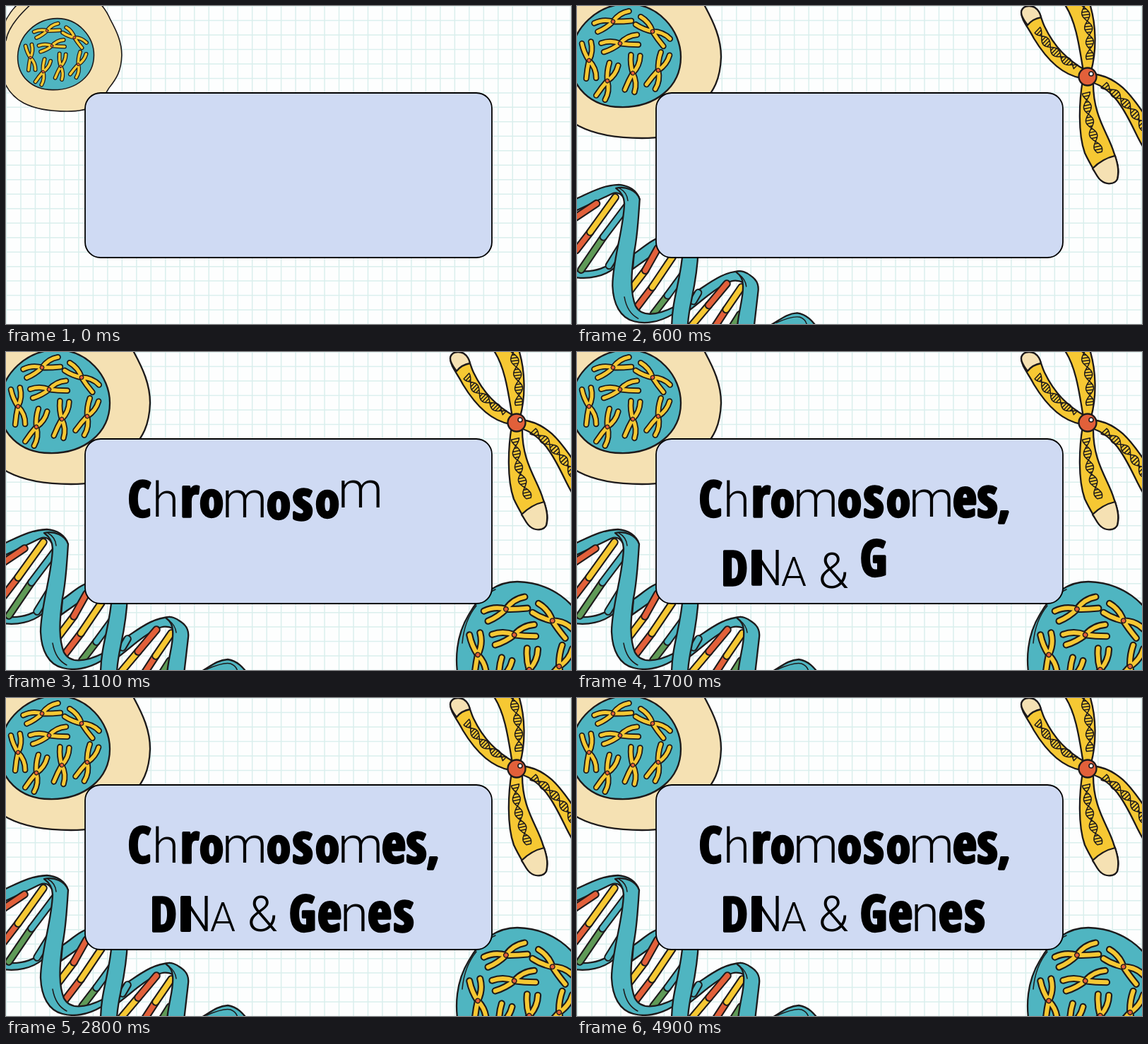
An HTML page for the animation above (5 s loop, 800 by 450 pixels).

```html
<!DOCTYPE html>
<html lang="en">
<head>
<meta charset="utf-8">
<title>Chromosomes, DNA &amp; Genes</title>
<style>
html, body { margin: 0; width: 100%; height: 100%; overflow: hidden; background: #fdfefe; }
svg { display: block; width: 100vw; height: 100vh; }
.ink { stroke: #1d1a1b; stroke-width: 2.3; stroke-linejoin: round; stroke-linecap: round; }
.line { fill: none; }
.thin { fill: none; stroke-width: 1.5; }
text { text-anchor: middle; stroke: #000; stroke-linejoin: round; }
.heavy { font: 700 10px "Open Sans Condensed", "Roboto Condensed", "Open Sans", sans-serif; font-stretch: 75%; stroke-width: 3.4; }
.light { font: 300 10px Roboto, Lato, "Open Sans", sans-serif; font-stretch: 75%; stroke-width: 0; }
</style>
</head>
<body>
<svg id="stage" viewBox="0 0 800 450"></svg>
<script>
const TEAL = '#4fb5c1', BEIGE = '#f5e1b3', YELLOW = '#f6c833', RED = '#e2603a', GREEN = '#5f9a57', INK = '#1d1a1b';
const LOOP = 5000, STEP = 100;
const stage = document.getElementById('stage');

const shape = (d, fill) => `<path class="ink" d="${d}" fill="${fill}"/>`;
const line = (d, kind = 'line') => `<path class="ink ${kind}" d="${d}"/>`;
const stroke = (d, color, width) =>
  `<path d="${d}" fill="none" stroke="${color}" stroke-width="${width}" stroke-linecap="round" stroke-linejoin="round"/>`;
const tube = (d, color, outer, inner) => stroke(d, INK, outer) + stroke(d, color, inner);
const bar = (x1, y1, x2, y2, color) => tube(`M${x1} ${y1}L${x2} ${y2}`, color, 11.6, 7.4);

function grid() {
  let d = '';
  for (let p = .5; p < 801; p += 20.48) d += `M${p} 0V450M0 ${p - .5}H800`;
  return `<path d="${d}" stroke="#daefed" stroke-width="1.5"/>`;
}

function smallChromosome([x, y, angle]) {
  const arms = 'M-26 -6Q-12 -8 0 0Q12 -9 26 -7M-25 7Q-12 6 0 0Q11 4 25 7';
  return `<g transform="translate(${x} ${y}) rotate(${angle})">${tube(arms, YELLOW, 8.6, 5)}
    <circle class="ink" r="2.8" fill="${RED}" style="stroke-width:1.2"/></g>`;
}

const cluster = [[51, 22, -18], [107, 36, 38], [61, 53, -12], [17, 77, 83],
  [43, 106, 112], [79, 95, 100], [115, 91, 114]].map(smallChromosome).join('');

const cell =
  shape('M-34 132C-55 90 -45 35 -33 0C-20 -25 0 -45 30 -57H110C150 -50 168 -30 181 0C194 24 204 46 204 72C203 105 193 120 178 139C158 175 142 187 92 187C60 187 28 183 3 170C-15 160 -27 146 -34 132Z', BEIGE) +
  line('M-33 42C-28 10 5 -20 22 -36') +
  shape('M-9 74C-7 30 30 -3 72 -3C115 -3 147 34 147 72C147 115 110 144 62 143C20 143 -10 115 -9 74Z', TEAL) + cluster;

const nucleus =
  shape('M642 470C634 435 638 400 655 372C672 342 694 325 724 325C770 326 808 352 826 400C838 460 790 515 725 513C680 512 650 495 642 470Z', TEAL) +
  line('M646 412C648 390 656 371 666 359M672 351C679 344 686 339 693 336', 'thin') +
  `<g transform="translate(648 338) scale(1.175)">${cluster}</g>`;

// Small double helix between two points, bowed sideways
function helix(x1, y1, x2, y2, bow) {
  const len = Math.hypot(x2 - x1, y2 - y1), nx = (y1 - y2) / len, ny = (x2 - x1) / len;
  const at = (s, side) => {
    const off = bow * Math.sin(Math.PI * s) + side * 5.5 * Math.cos(Math.PI * s * len / 20);
    return `${(x1 + (x2 - x1) * s + nx * off).toFixed(1)} ${(y1 + (y2 - y1) * s + ny * off).toFixed(1)}`;
  };
  let a = '', b = '', rungs = '';
  for (let i = 0; i <= 40; i++) {
    const s = i / 40;
    a += (i ? 'L' : 'M') + at(s, 1);
    b += (i ? 'L' : 'M') + at(s, -1);
    if (i % 2 == 0) rungs += `M${at(s, 1)}L${at(s, -1)}`;
  }
  return line(a + b + rungs, 'thin');
}

const chromosome =
  shape('M717 92C712 65 708 25 692 0L680 -30H715L727 0C735 28 736 62 728 92Z', YELLOW) +
  shape('M731 96C770 101 788 132 806 157V206C788 184 775 122 729 108Z', YELLOW) +
  shape('M714 102C690 98 667 79 647 46C639 30 629 20 629 9C630 0 640 -2 648 2C657 9 657 19 662 29C676 58 694 76 720 91Z', YELLOW) +
  shape('M629 9C630 0 640 -2 648 2C654 6 656 11 657 16Q645 18 638 27C634 21 629 16 629 9Z', BEIGE) +
  shape('M716 105C711 135 709 180 719 208C726 223 731 230 737 241C744 252 759 254 765 245C769 232 764 218 760 207C753 181 730 157 731 107Z', YELLOW) +
  shape('M730 230C735 237 737 243 742 247C750 254 762 252 765 245C768 232 765 222 762 212Q744 216 730 230Z', BEIGE) +
  helix(652, 34, 706, 86, 5) + helix(715, -8, 726, 75, -4) +
  helix(746, 112, 804, 174, -5) + helix(721, 123, 740, 207, 4) +
  `<circle class="ink" cx="723" cy="100" r="12.5" fill="${RED}"/>
   <circle class="ink" cx="728" cy="96" r="3" fill="#fff" style="stroke-width:1.6"/>`;

const rungs = [
  [-4, 298, 26, 278, RED], [-3, 345, 17, 319, RED], [17, 319, 53, 269, YELLOW],
  [4, 373, 36, 326, GREEN], [36, 326, 70, 281, TEAL], [44, 367, 62, 338, TEAL],
  [74, 403, 96, 374, YELLOW], [96, 374, 114, 342, RED],
  [80, 432, 106, 398, RED], [106, 398, 135, 355, YELLOW],
  [108, 436, 128, 410, GREEN], [128, 410, 150, 380, TEAL], [165, 418, 172, 406, TEAL],
  [160, 456, 187, 424, YELLOW], [187, 424, 213, 393, RED],
  [195, 456, 212, 430, RED], [212, 430, 234, 398, YELLOW], [220, 456, 232, 437, GREEN]
].map(r => bar(...r)).join('');

const dna =
  shape('M-60 345C-40 375 -20 375 5 375C25 376 40 370 56 358L52 370C38 382 15 388 -10 383C-35 378 -50 365 -60 345Z', TEAL) +
  shape('M80 350C95 340 105 328 130 322V340C110 348 95 360 78 372Z', TEAL) +
  shape('M-40 285C5 272 25 252 58 251C72 252 84 259 88 272L66 278C66 266 58 260 48 264C25 275 5 285 -30 300Z', TEAL) +
  shape('M160 410C185 395 205 376 232 375L238 392C226 386 218 389 210 394C190 404 175 420 158 432Z', TEAL) +
  rungs +
  shape('M88 272C86 300 85 325 80 348C75 385 75 407 82 425C90 440 110 440 138 426L135 437C115 449 95 451 80 447C60 442 50 422 49 396C49 360 65 315 66 278C66 268 62 262 54 256C68 253 84 259 88 272Z', TEAL) +
  line('M59 256Q70 262 71 274M66 412Q70 435 86 443', 'thin') +
  shape('M150 345C147 390 134 415 134 456H157C157 425 170 400 172 345Z', TEAL) +
  shape('M226 376C233 373 242 377 248 382C257 388 259 396 258 404L252 456H228C230 430 238 410 236 394C236 387 233 381 226 376Z', TEAL) +
  line('M231 380Q240 387 241 397', 'thin') +
  shape('M268 456C285 450 295 436 314 435C328 437 336 447 343 456Z', TEAL) +
  line('M284 449C298 443 310 439 318 441Q326 444 328 452', 'thin');

// Parts pop in one after another, each about its own centre
const parts = [
  { art: cell, x: 74, y: 64, start: -60 },
  { art: chromosome, x: 725, y: 105, start: 160 },
  { art: dna, x: 145, y: 390, start: 380 },
  { art: nucleus, x: 730, y: 418, start: 600 }
];

// letter, centre x, slot width, face
const lines = [
  { y: 233, order: 0, letters: [['C', 189, 36, 'heavy'], ['h', 226, 38, 'light'], ['r', 260, 30, 'heavy'],
    ['o', 291, 34, 'heavy'], ['m', 338, 64, 'light'], ['o', 386, 34, 'heavy'], ['s', 420, 33, 'heavy'],
    ['o', 455, 34, 'heavy'], ['m', 502, 64, 'light'], ['e', 549, 34, 'heavy'], ['s', 581, 33, 'heavy'],
    [',', 605, 18, 'heavy']] },
  { y: 330, order: 13, letters: [['D', 223, 37, 'heavy'], ['N', 267, 50, 'light'], ['A', 307, 36, 'light'], [' '],
    ['&amp;', 363, 44, 'light'], [' '], ['G', 420, 40, 'heavy'], ['e', 458, 34, 'heavy'], ['n', 493, 40, 'light'],
    ['e', 529, 34, 'heavy'], ['s', 563, 33, 'heavy']] }
];

// The N has one heavy stem
const glyph = (y, i, [ch, x, slot, face]) => ch == ' ' ? '' :
  `<g class="glyph" data-order="${i}">${ch == 'N' ? `<rect x="247" y="${y - 50}" width="15" height="51" rx="2"/>` : ''}
   <text class="${face}" x="${x}" y="${y}" data-slot="${slot}">${ch}</text></g>`;

stage.innerHTML = grid() + parts.map(p => `<g class="part">${p.art}</g>`).join('') +
  '<rect x="112" y="123" width="576" height="233" rx="22" fill="#cfdaf3" stroke="#000" stroke-width="1.8"/>' +
  lines.map(l => l.letters.map((g, i) => glyph(l.y, l.order + i, g)).join('')).join('');

// Pick the largest size that keeps each letter clear of its neighbours
for (const el of stage.querySelectorAll('text')) {
  const max = /[a-gi-z]/.test(el.textContent) ? 78 : 70;
  el.style.fontSize = max + 'px';
  el.style.fontSize = Math.min(max, max * el.dataset.slot / el.getComputedTextLength()) + 'px';
}

const partEls = stage.querySelectorAll('.part'), glyphEls = stage.querySelectorAll('.glyph');

function draw(t) {
  parts.forEach(({ x, y, start }, i) => {
    const age = t - start, k = 1 - Math.exp(-age / 51);
    partEls[i].setAttribute('visibility', age > 0 ? 'visible' : 'hidden');
    if (age > 0) partEls[i].setAttribute('transform', `translate(${x} ${y}) scale(${k}) translate(${-x} ${-y})`);
  });
  for (const el of glyphEls) {
    const age = t - 610 - el.dataset.order * 54.5;
    el.setAttribute('visibility', age > 0 ? 'visible' : 'hidden');
    if (age > 0) el.setAttribute('transform', `translate(0 ${-36 * Math.exp(-age / 85) * Math.cos(age * Math.PI / 210)})`);
  }
}

const origin = performance.now();
function tick() {
  const t = (performance.now() - origin) % LOOP;
  draw(Math.floor(t / STEP) * STEP);
  requestAnimationFrame(tick);
}
draw(0);
requestAnimationFrame(tick);
</script>
</body>
</html>
```
